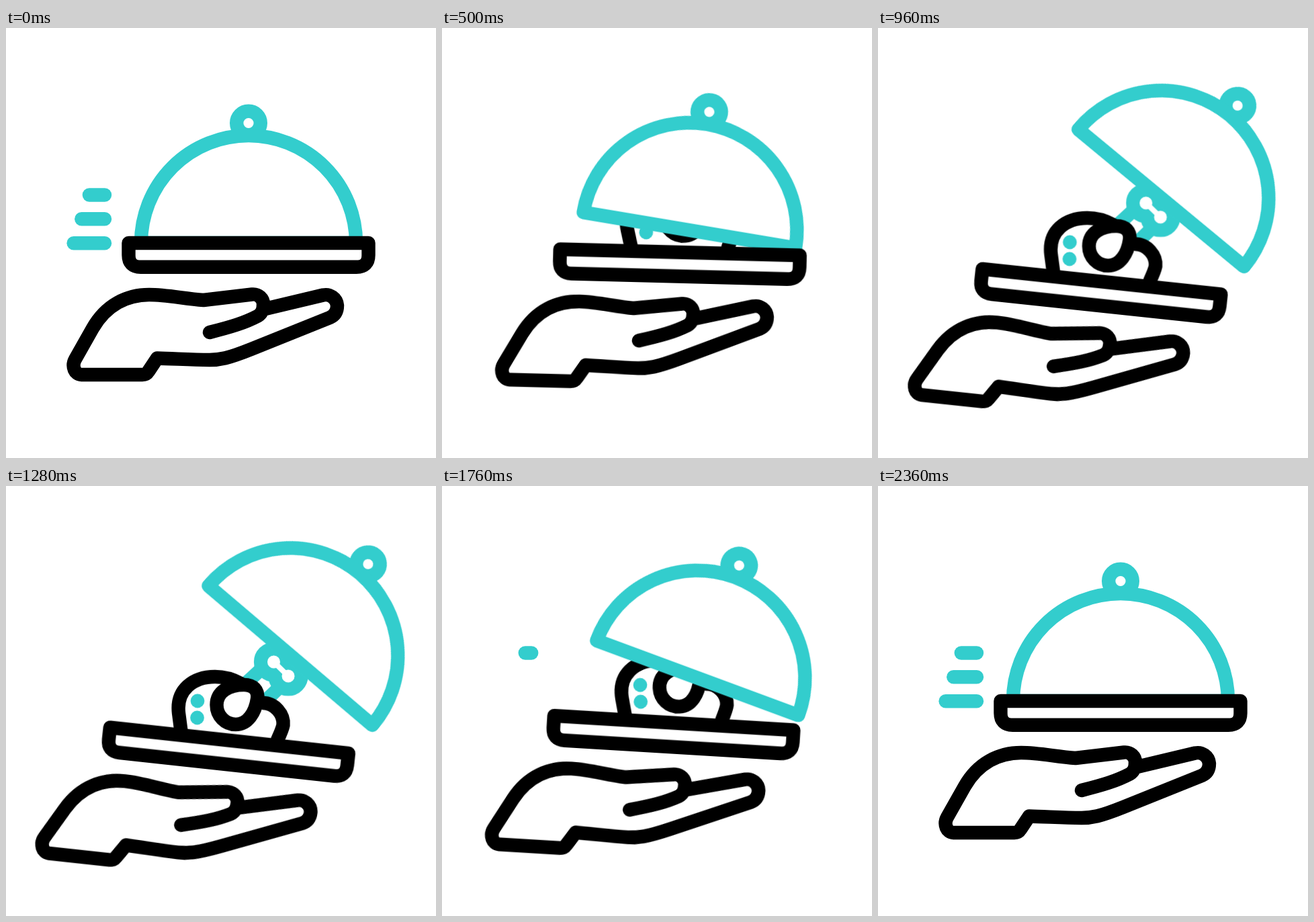
An HTML page without scripts that plays this animation: 640x640 px, repeating every 2.4 s.

```html
<!DOCTYPE html>
<html lang="en">
<head>
<meta charset="utf-8">
<title>Serving dish</title>
<style>
  html, body { margin: 0; height: 100%; overflow: hidden; background: #fff; }
  svg { display: block; width: 100%; height: 100%; }
  svg { --teal: #33cdcd; --ease: cubic-bezier(.8, 0, .2, 1); }

  .ink, .teal { fill: none; stroke-width: 20.4; stroke-linecap: round; stroke-linejoin: round; }
  .ink { stroke: #000; }
  .teal { stroke: var(--teal); }
  .dot { fill: var(--teal); stroke: none; }
  .white { fill: #fff; }
  .hollow { fill: #fff; stroke: #fff; stroke-width: 8; }

  .lower { transform-origin: 361px 320px; animation: lower 2400ms var(--ease) infinite; }
  .open { transform-origin: 521px 320px; animation: open 2400ms var(--ease) infinite; }
  .speed path { stroke-dasharray: 1 2; animation: sweep 2400ms linear infinite; }
  .speed path:nth-child(2) { animation-delay: 100ms; }
  .speed path:nth-child(3) { animation-delay: 200ms; }

  @keyframes lower {
    0%, 97.4%, 100% { transform: translate(0, 0) rotate(0deg); }
    48.9%, 50.4% { transform: translate(-28.7px, 58.8px) rotate(6.2deg); }
  }
  @keyframes open {
    0%, 96.8%, 100% { transform: translate(0, 0) rotate(0deg); }
    48.9%, 49.8% { transform: translate(49.3px, -45.7px) rotate(34.3deg); }
  }
  /* Each line leaves to the right, then grows back from the left. */
  @keyframes sweep {
    0% { stroke-dashoffset: 0; }
    8.333% { stroke-dashoffset: -1.02; animation-timing-function: step-end; }
    70% { stroke-dashoffset: 1; }
    78.333%, 100% { stroke-dashoffset: 0; }
  }
</style>
</head>
<body>
<svg viewBox="0 0 640 640">
  <g class="teal speed">
    <path pathLength="1" d="M123.8 248.5H147"/>
    <path pathLength="1" d="M112.3 284.3H147"/>
    <path pathLength="1" d="M100.6 320.2H147"/>
  </g>

  <g class="lower">
    <!-- roast, laid out on the tilted tray -->
    <g transform="translate(361 320) rotate(-6.2) translate(-332.3 -378.8)">
      <g class="teal">
        <path d="M360 291L384 269M387 319L411 296"/>
        <circle cx="398.5" cy="262" r="19.4"/>
        <circle cx="420" cy="283" r="19.4"/>
        <g class="hollow">
          <circle cx="398.5" cy="262" r="5.5"/>
          <circle cx="420" cy="283" r="5.5"/>
          <path d="M398.5 262L420 283"/>
        </g>
        <circle class="dot" cx="285" cy="320" r="10.4"/>
        <circle class="dot" cx="284.5" cy="345" r="10.4"/>
      </g>
      <g class="ink">
        <path d="M260.5 365L257 338C253 303 279 284 311 284C326 284 338 288 349 294"/>
        <path d="M382 323C400 323 414 340 412.5 356Q411 363 404 378"/>
        <path class="white" d="M313.5 326C313.5 306 332 296 354 296C368 296 376 304 374 317C371 337 360 355 342 355C326 355 313.5 342 313.5 326Z"/>
      </g>
    </g>

    <g class="teal open">
      <circle cx="361" cy="141.5" r="17.8"/>
      <path class="white" d="M201 320A160 160 0 0 1 521 320Z"/>
    </g>

    <!-- tray and hand -->
    <g class="ink">
      <path class="white" d="M182.5 320H539.5V338Q539.5 355.7 521.5 355.7H200.5Q182.5 355.7 182.5 338Z"/>
      <path d="M303 453C335 445 355 439 375 428.5C382 424 383 418 383 411C383 403 376 395.5 366 396.5L294 405C265 403 240 397 213 397C180 397 149 412 129 447L103 493C97 504 103 516 112 516H203Q209 516 212 511L225 491.5C250 492 275 494 303 494C318 494 330 492 365 478L482 431C489 428 493 422 493 413C492 402 482 395.5 472 397.5L388 417.5"/>
    </g>
  </g>
</svg>
</body>
</html>
```
